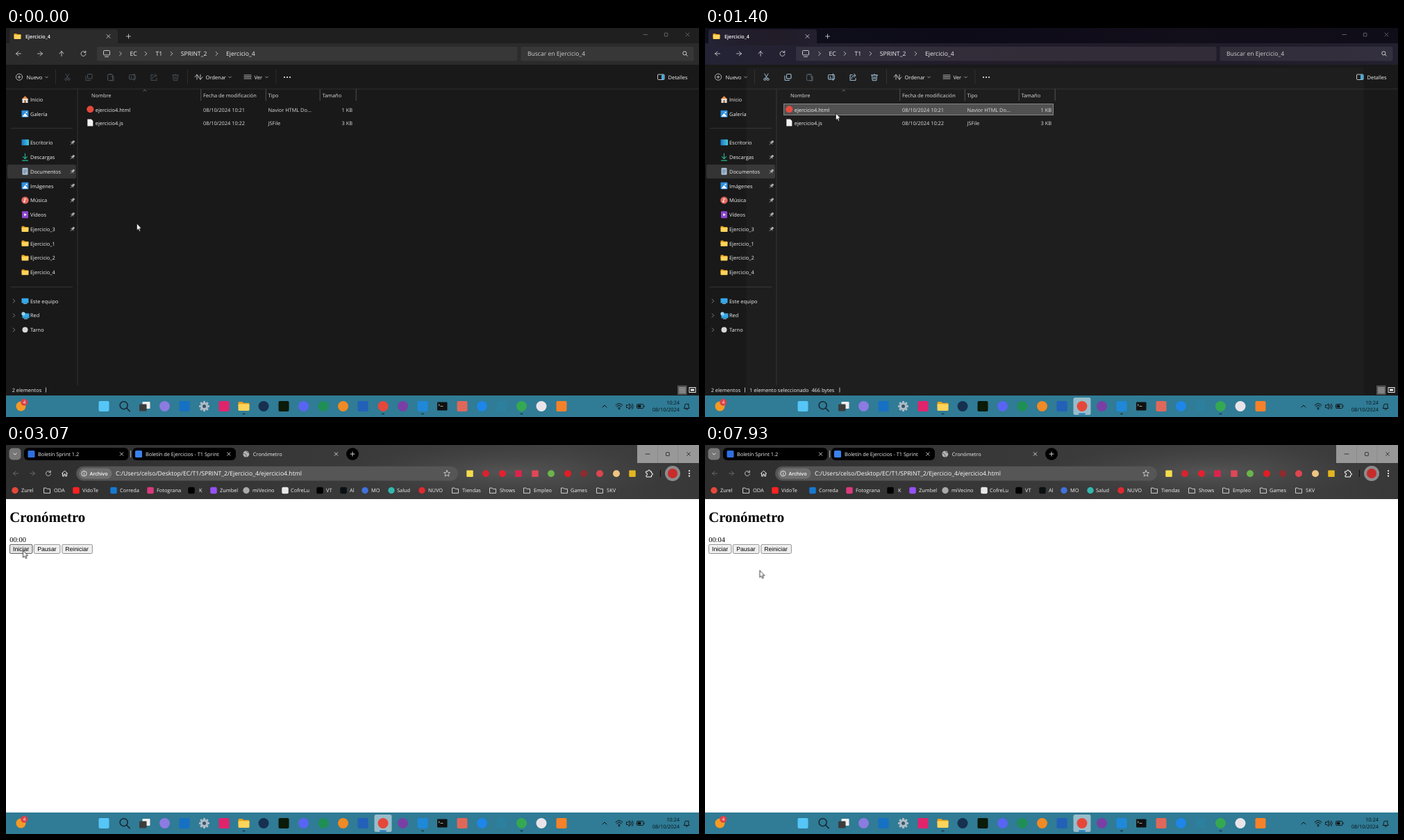
An HTML page that plays this animation: 998x561 px, repeating every 8000 ms.

```html
<!DOCTYPE html>
<html lang="es">
<head>
<meta charset="utf-8">
<title>Cronómetro</title>
<style>
html, body { margin: 0; width: 100%; height: 100%; overflow: hidden; background: #191919; }
svg { display: block; width: 100%; height: 100%; font-family: "Open Sans", "Noto Sans", sans-serif; text-rendering: geometricPrecision; }
.gate { animation: 8s step-end infinite; }
.sheet { animation: open 8s linear infinite; }
.cursor { animation: move 8s ease-in-out infinite; }
.serif { font-family: "Liberation Serif", serif; }
.sans { font-family: "Liberation Sans", sans-serif; }
@keyframes open {
  0%, 17.5% { opacity: 0; transform: translate(60px, 58px) scale(.89); }
  18%, 18.375% { opacity: 1; transform: translate(38px, 37px) scale(.928); animation-timing-function: ease-out; }
  20.6%, 100% { opacity: 1; transform: none; }
}
@keyframes move {
  0%, .7% { transform: translate(188px, 281.5px); }
  10%, 19.2% { transform: translate(188px, 122.5px); }
  23.4%, 24.2% { transform: translate(205px, 124px); }
  34.125% { transform: translate(40px, 176px); animation-timing-function: ease-out; }
  39.5%, 42.6% { transform: translate(23px, 150px); }
  47.5%, 51.5% { transform: translate(71px, 198.5px); }
  51.625%, 80.2% { transform: translate(71px, 199.3px); }
  85%, 97.6% { transform: translate(60px, 149px); animation-timing-function: linear; }
  99.1%, 100% { transform: translate(78.5px, 180.5px); }
}
</style>
</head>
<body>
<svg id="stage" viewBox="0 0 998 561" preserveAspectRatio="none"></svg>
<script>
const LOOP = 8000;
let rules = '', gates = 0;

const rect = (x, y, w, h, fill, r = 0, more = '') =>
  `<rect x="${x}" y="${y}" width="${w}" height="${h}" rx="${r}" fill="${fill}" ${more}/>`;
const frame = (x, y, w, h, color, r = 1, line = .9) => rect(x, y, w, h, 'none', r, `stroke="${color}" stroke-width="${line}"`);
const dot = (x, y, r, fill) => `<circle cx="${x}" cy="${y}" r="${r}" fill="${fill}"/>`;
const ring = (x, y, r, color, w = .8) =>
  `<circle cx="${x}" cy="${y}" r="${r}" fill="none" stroke="${color}" stroke-width="${w}"/>`;
const line = (d, color = '#ddd', w = .8) =>
  `<path d="${d}" fill="none" stroke="${color}" stroke-width="${w}" stroke-linecap="round" stroke-linejoin="round"/>`;
const shape = (d, fill) => `<path d="${d}" fill="${fill}"/>`;
// y is the middle of the capitals
const text = (x, y, s, size = 7.4, fill = '#f2f2f2', more = '') =>
  `<text x="${x}" y="${(y + size * .357).toFixed(2)}" font-size="${size}" fill="${fill}" xml:space="preserve" ${more}>${s}</text>`;
const box = (x, y, s, fill, r = 1) => rect(x - s / 2, y - s / 2, s, s, fill, r);
const each = (list, draw) => list.map(draw).join('');

// shows body only from on to off (ms)
function gate(on, off, body) {
  const name = 'g' + gates++;
  rules += `@keyframes ${name}{0%{opacity:0}${on * 100 / LOOP}%{opacity:1}${off * 100 / LOOP}%{opacity:${off < LOOP ? 0 : 1}}}`;
  return `<g class="gate" style="animation-name:${name}">${body}</g>`;
}

const cross = (x, y, color, r = 2.5) => line(`M${x - r} ${y - r}l${2 * r} ${2 * r}m0 ${-2 * r}l${-2 * r} ${2 * r}`, color);
const plus = (x, y, color, r = 3) => line(`M${x - r} ${y}h${2 * r}M${x} ${y - r}v${2 * r}`, color);
const chevR = (x, y, color = '#ddd') => line(`M${x - 1.3} ${y - 2.6}l2.6 2.6l-2.6 2.6`, color);
const chevD = (x, y, color = '#bbb', r = 1.8) => line(`M${x - r} ${y - r / 2}l${r} ${r}l${r} ${-r}`, color);
const arrow = (x, y, dx, dy, color = '#ddd') => line(
  `M${x - dx * 3.5} ${y - dy * 3.5}L${x + dx * 3.5} ${y + dy * 3.5}` +
  `M${x + dy * 3} ${y + dx * 3}L${x + dx * 3.5} ${y + dy * 3.5}L${x - dy * 3} ${y - dx * 3}`, color);
const reload = (x, y) => line(`M${x + 3} ${y - 1.8}A3.5 3.5 0 1 0 ${x + 3.5} ${y + .5}M${x + 3.3} ${y - 4}v2.4h-2.4`);
const lens = (x, y, r, color, w) => ring(x - r * .25, y - r * .25, r, color, w) + line(`M${x + r * .5} ${y + r * .5}l${r * .8} ${r * .8}`, color, w);
const folder = (x, y, k = 1) => `<g transform="translate(${x} ${y}) scale(${k})">` +
  shape('M-5-3.2q0-.9.9-.9h2.6l1.3 1.2h4.3q.9 0 .9.9v2h-10z', '#e8a21f') + rect(-5, -2, 10, 6, '#ffd45a', .8) + '</g>';
const page = (x, y, fill) => shape(`M${x - 4} ${y - 5}h5.5l2.5 2.5v7.5h-8z`, fill);
const picture = (x, y) => rect(x - 5, y - 5, 10, 10, '#2f8fe0', 1) + shape(`M${x - 4} ${y + 4}l4-5l4 5z`, '#fff') + dot(x + 2, y - 2, 1.1, '#fff');
const screen = (x, y) => rect(x - 5, y - 4, 10, 7, '#35a7e8', .8) + rect(x - 2.5, y + 3.3, 5, 1, '#8ec9e8');
const pin = (x, y) => `<g transform="translate(${x} ${y}) rotate(45)">${rect(-1.5, -3.5, 3, 4, '#aaa', .5)}${line('M-2.5.8h5M0 .8v3', '#aaa', .9)}</g>`;

const captions = color =>
  line('M918 9.5h5.5', color) + frame(948.3, 7.3, 4.6, 4.6, color, .7, .8) + cross(981.5, 9.5, color);

const frameBars = (bar, row, field) =>
  rect(0, 0, 998, 53, bar) + rect(0, 22, 998, 31, row) + rect(5, 2, 156, 23, row, 4) +
  rect(131, 27, 605.5, 20.5, field, 2) + rect(741.5, 27, 249, 20.5, field, 2);

const toolIcons = (c, paste) =>
  ring(86.3, 74, 1.5, c) + ring(90.6, 74, 1.5, c) + line('M85.8 66l4.2 6.8M91 66l-4.2 6.8', c) +
  frame(117.5, 66.5, 6.5, 6.5, c) + line('M115 69v6.5h6.5', c) +
  frame(146.5, 67, 7, 8.5, paste) + line('M149 66.5h3M152 70h3v6h-4', paste) +
  frame(177.5, 67.5, 9, 6.5, c) + text(179, 70.8, 'A', 5, c) + line('M184.5 66v9.5', c) +
  line('M212 67.5h-3v8h8v-3M211 73q0-4.5 5-4.5M214.5 66l2.5 2.5l-2.5 2.5', c) +
  line('M239.5 68h9M242.5 68q1.5-3 3 0M240.5 68l.7 7.7h5.6l.7-7.7M243 70.5v3M245 70.5v3', c);

function sidebar() {
  const items = ['Inicio', 'Galería', '', 'Escritorio', 'Descargas', 'Documentos', 'Imágenes', 'Música', 'Vídeos',
    'Ejercicio_3', 'Ejercicio_1', 'Ejercicio_2', 'Ejercicio_4', '', 'Este equipo', 'Red', 'Tarno'];
  const icons = {
    Inicio: y => shape(`M22.5 ${y}l5-5l5 5z`, '#e98b45') + rect(23.5, y - 1, 8, 6, '#e8e2dc') + rect(26.3, y + 1, 2.4, 4, '#9c6a43'),
    Galería: y => picture(27.5, y),
    Imágenes: y => picture(27.5, y),
    Escritorio: y => rect(22.5, y - 4.5, 10.5, 8.5, 'url(#desk)', .8),
    Descargas: y => line(`M27.5 ${y - 5}v7.5m-3-3l3 3l3-3M23.5 ${y + 5}h8`, '#27b893', 1.1),
    Documentos: y => rect(23.5, y - 5, 8, 10, '#a9c0d6', 1) + line(`M25.5 ${y - 2}h4m-4 2h4m-4 2h2.5`, '#43617d', .7),
    Música: y => dot(27.5, y, 5.2, '#e5685e') + line(`M27 ${y + 2}v-4.5l2 1`, '#fff', .9) + dot(26.3, y + 2, 1.1, '#fff'),
    Vídeos: y => rect(23, y - 5, 9, 10, '#8d45cf', 1) + shape(`M26.3 ${y - 2}l3.5 2l-3.5 2z`, '#fff'),
    'Este equipo': y => screen(27.5, y),
    Red: y => screen(28.5, y + 1) + dot(25, y - 2.5, 2.6, '#9cd3ee'),
    Tarno: y => dot(27.5, y, 4, '#d8d8d8')
  };
  return rect(2, 197, 99, 20, '#343434', 2) + rect(7, 144.3, 89, .8, '#3b3b3b') + rect(7, 373, 89, .8, '#3b3b3b') +
    each(items, (name, i) => {
      if (!name) return '';
      const y = 103 + i * 20.77, icon = icons[name];
      return (icon ? icon(y) : folder(27.5, y)) + text(35, y + .3, name) +
        (i > 2 && i < 10 ? pin(95.8, y) : i > 13 ? chevR(11.5, y, '#999') : '');
    });
}

const fileRow = (y, name, time, type, size, icon) =>
  icon + text(128.8, y, name) + text(284, y, time, 7.4, '#ddd') +
  text(377.5, y, type, 7.4, '#ddd') + text(499, y, size, 7.4, '#ddd', 'text-anchor="end"');

function explorer() {
  const crumbs = [[178.5, 'EC'], [215.5, 'T1'], [251.8, 'SPRINT_2'], [317, 'Ejercicio_4']];
  const heads = [[123, 'Nombre'], [284, 'Fecha de modificación'], [377.5, 'Tipo'], [455.5, 'Tamaño']];
  return rect(0, 0, 998, 530, '#191919') + frameBars('#1f1f1f', '#2b2b2b', '#373737') +
    gate(1070, LOOP, frameBars('url(#mica)', 'url(#micaRow)', 'rgba(255,255,255,.07)')) +
    captions('#777') + gate(1070, 1400, captions('#fff')) +
    folder(16.5, 12) + text(28, 12, 'Ejercicio_4', 7.2, '#fff', 'font-weight="600"') + cross(147.5, 12, '#ddd') + plus(176.5, 12, '#ddd') +
    arrow(18, 37, -1, 0) + arrow(49, 37, 1, 0) + arrow(80, 37, 0, -1) + reload(111.5, 37) +
    frame(140.5, 32.5, 9, 6.5, '#ddd') + line('M142.5 41.5h5') +
    each([165, 201.5, 238.5, 303.5], x => chevR(x, 37)) + each(crumbs, ([x, s]) => text(x, 37, s, 8.6)) +
    text(751, 37.3, 'Buscar en Ejercicio_4', 8.55, '#d2d2d2') + lens(978, 37, 2.6, '#ddd', .9) +
    rect(0, 53, 998, 35, '#191919') + rect(0, 87.5, 998, .9, '#343434') +
    ring(19, 70.7, 4.6, '#ddd') + plus(19, 70.7, '#ddd', 2) + text(29.5, 71, 'Nuevo', 7.6) + chevD(58.5, 71) +
    each([71, 261, 388.5], x => rect(x, 60, .8, 21, '#333')) +
    toolIcons('#4f5a63', '#4f5a63') + gate(1070, LOOP, toolIcons('#a9cfe8', '#4f5a63')) +
    arrow(275, 70.7, 0, -1) + arrow(280, 70.7, 0, 1) + text(287.5, 71, 'Ordenar', 7.5) + chevD(322.5, 71) +
    line('M343 68h10M343 70.5h10M343 73h10') + text(357.5, 71, 'Ver', 7.5) + chevD(375.5, 71) +
    each([401, 405, 409], x => dot(x, 71, 1.1, '#eee')) +
    frame(938.5, 67, 9.5, 7.5, '#ddd') + rect(944, 67, 4, 7.5, '#45a8dc', .8) + text(953.5, 71, 'Detalles', 7.5) +
    rect(102.5, 88, .9, 427, '#363636') + sidebar() +
    line('M197.8 91l2-1.8l2 1.8', '#999', .7) +
    each([280.3, 373.8, 451.7, 503.7], x => rect(x, 88, .9, 17, '#555')) +
    each(heads, ([x, s]) => text(x, 97.2, s, 7.4, '#ddd')) +
    gate(530, 670, rect(113, 128.5, 389, 17, '#333')) + gate(670, 1070, rect(113, 109, 389, 17, '#333')) +
    gate(1070, LOOP, rect(113.5, 109.5, 388, 16, '#4d4d4d', 0, 'stroke="#8c8c8c" stroke-width=".9"')) +
    fileRow(117.9, 'ejercicio4.html', '08/10/2024 10:21', 'Navior HTML Do...', '1 KB', dot(121.3, 117.3, 5, '#e5483a')) +
    fileRow(137.2, 'ejercicio4.js', '08/10/2024 10:22', 'JSFile', '3 KB', page(121.3, 136.5, '#f2f2f2')) +
    text(8.7, 522.5, '2 elementos') + rect(57, 518.5, .9, 7, '#ccc') +
    gate(1070, LOOP, text(64, 522.5, '1 elemento seleccionado  466 bytes') + rect(193.5, 518.5, .9, 7, '#ccc')) +
    rect(967, 515.5, 13.5, 13.5, '#555') + line('M969.5 519h9M969.5 521.3h9M969.5 523.6h9M969.5 526h9', '#eee', .7) +
    frame(984, 518.5, 9, 7, '#eee', 0, 1) + rect(986, 520.5, 5, 3, '#eee');
}

function button(x, w, label, tx, hover, press) {
  const face = (fill, edge) => rect(x + .4, 143.4, w, 13.1, fill, 2, `stroke="${edge}" stroke-width=".8"`);
  return face('#efefef', '#767676') +
    (hover ? gate(...hover, face('#e2e2e2', '#4f4f4f')) + gate(...press, face('#f6f6f6', '#8d8d8d')) : '') +
    text(tx, 149.4, label, 8.67, '#000', 'class="sans"');
}

function bookmarks() {
  const outline = (x, y) => line(`M${x - 4.5} ${y + 3.5}v-7h3.5l1.2 1.3h4.3v5.7z`, '#ddd', .9);
  const items = [[13, 22, 'Zurel', '#e5483a'], [59, 69, 'ODA'], [101, 110, 'VidoTe', '#f22', 1], [155, 164, 'Correda', '#1679d0', 1],
    [208, 217, 'Fotograna', '#d93a7c', 1], [267, 278, 'K', '#000', 1], [299, 308, 'Zumbel', '#9650f5', 1], [346, 355, 'miVecino', '#aaa'],
    [402, 410, 'CofreLu', '#e8e8e8', 1], [452, 461, 'VT', '#000', 1], [486, 495, 'Al', '#0b1113', 1], [517, 526, 'MO', '#3f72dc'],
    [555, 563, 'Salud', '#32b8ae'], [599, 608, 'NUVO', '#e02a31'], [647, 657, 'Tiendas'], [701, 711, 'Shows'],
    [750, 760, 'Empleo'], [804, 813, 'Games'], [855, 865, '5KV']];
  return each(items, ([ix, x, s, fill, square]) =>
    (!fill ? outline(ix, 65.5) : square ? box(ix, 65.5, 9.5, fill, 2) : dot(ix, 65.5, 4.7, fill)) + text(x, 65.5, s));
}

function browser() {
  const addons = [[668, '#f3dc4d', 1], [691, '#d8232e'], [715, '#e3212f'], [738, '#dc244c', 1], [762, '#e04756', 1], [785, '#6bb44b'],
    [809, '#e11d25'], [832, '#8f2b2e'], [855, '#de4550'], [879, '#edc481'], [902, '#e2b520', 1]];
  const clock = each([0, 1, 2, 3, 4], n => gate(n && 3270 + n * 1000, n < 4 ? 4270 + n * 1000 : LOOP,
    `<text class="serif" x="5.2" y="140" font-size="10.4">00:0${n}</text>`));
  return rect(0, 0, 998, 530, '#fff') + rect(0, 0, 998, 78, 'url(#stone)') + rect(490, 0, 470, 78, 'url(#haze)') +
    rect(909, 0, 89, 26, '#989898') + rect(938, 0, .7, 26, '#858585') + rect(967.5, 0, .7, 26, '#858585') +
    line('M921 13h6', '#222') + frame(950.5, 10.7, 4.8, 4.8, '#222', .5, .8) + cross(983, 13, '#222') +
    rect(4.5, 4.5, 17, 17, '#777', 5) + chevD(13, 13, '#fff', 2.2) +
    rect(26, 4, 150.5, 18, '#000', 6) + rect(182, 4, 149, 18, '#000', 6) + rect(179, 8, 1, 10, '#aaa') +
    box(36.5, 13, 10, '#2f6fe0', 1.5) + text(46, 13.2, 'Boletín Sprint 1.2') + cross(166.5, 13, '#eee', 2.3) +
    box(191, 13, 10, '#3b82ef', 1.5) + text(201, 13.2, 'Boletín de Ejercicios - T1 Sprint') + cross(320.8, 13, '#eee', 2.3) +
    dot(345.8, 13, 4.5, '#b5b5b5') + line('M342 12q3 0 3.5 2t1 3M346 9q0 2 3.5 2.5', '#555', .9) +
    text(355.7, 13.2, 'Cronómetro') + cross(475.5, 13, '#eee', 2.3) + dot(499, 13, 9, '#000') + plus(499, 13, '#fff') +
    arrow(14, 41, -1, 0, '#777') + arrow(38, 41, 1, 0, '#777') + reload(61, 41) +
    line('M80.5 41l4-3.7l4 3.7M81.5 40.5v4.5h2v-3h2v3h2v-4.5', '#eee', 1) +
    rect(101, 30.7, 550, 20.8, '#565656', 10.4) + rect(105, 33.5, 47.5, 15.2, '#707070', 7.6) +
    ring(112.5, 41.2, 3.7, '#fff') + line('M112.5 40.8v2.2M112.5 39v.1', '#fff') +
    text(120.5, 41.3, 'Archivo', 7.2, '#fff', 'font-weight="600"') +
    text(158, 41.3, 'C:/Users/celso/Desktop/EC/T1/SPRINT_2/Ejercicio_4/ejercicio4.html', 8.63, '#fff') +
    line('M635 36.5l1.3 3l3.2.3l-2.4 2.1l.7 3.2l-2.8-1.7l-2.8 1.7l.7-3.2l-2.4-2.1l3.2-.3z', '#ddd') +
    each(addons, ([x, fill, square]) => square ? box(x, 41.3, 9.5, fill) : dot(x, 41.3, 5, fill)) +
    line('M922 38h2.5q0-2 1.5-2t1.5 2h2v2.5q2 0 2 1.5t-2 1.5v2.5h-7.5v-2.5q1.8 0 1.8-1.5t-1.8-1.5z', '#fff', 1) +
    rect(942, 36, 1, 10, '#111') + dot(960, 41, 11, '#8c8c8c') + dot(960, 41, 7, '#c92b2b') +
    each([37.3, 41, 44.7], y => dot(984, y, 1.1, '#fff')) + bookmarks() +
    '<text class="serif" x="5.2" y="111.1" font-size="20.8" font-weight="bold">Cronómetro</text>' + clock +
    button(5, 32.5, 'Iniciar', 10, [2960, 3530], [3200, 3270]) +
    button(40, 37.5, 'Pausar', 45.2, [6670, 7870], [7600, 7670]) +
    button(80.5, 43.5, 'Reiniciar', 85.3);
}

function taskbar() {
  const active = x => rect(x - 12.5, 533, 25, 25, 'rgba(255,255,255,.5)', 2.5) + rect(x - 5, 555.7, 10, 1.7, '#0f6fc0', .8);
  const running = x => rect(x - 2, 555.8, 4, 1.4, '#16394a', .7);
  const apps = [[141, '#55c6f7', 1], [228.5, '#8c7be0'], [257, '#1670c4', 1], [314, '#e0246c', 1], [371, '#17304f'], [400, '#0c1a08', 1],
    [428.5, '#5865f2'], [457, '#1f8f55'], [485.5, '#f08a24'], [514, '#2360b8', 1], [543, '#e5483a'], [571.5, '#7a3fa5'],
    [600, '#2088d8', 1], [657, '#e0685a', 1], [685.5, '#1d86e8'], [714, '#2d7f9e', 1], [742.5, '#35a852'], [771, '#e9e4ea'], [800, '#f5822a', 1]];
  const teeth = each([0, 45, 90, 135, 180, 225, 270, 315], a =>
    `<g transform="rotate(${a} 285.5 545.5)">${rect(284, 538, 3, 4, '#aebbc6', .6)}</g>`);
  return rect(0, 530, 998, 31, '#307b95') + each([342.5, 543, 600, 742.5], running) +
    gate(1070, 1400, active(342.5)) + gate(1400, LOOP, active(543)) +
    dot(21.5, 545.5, 7, '#f49a25') + dot(26.3, 539.7, 5, '#d9434a') + text(26.3, 539.8, '4', 6.5, '#fff', 'text-anchor="middle"') +
    lens(171, 545.5, 5.5, '#17262e', 1.5) +
    rect(196.5, 539, 11, 10, '#eee', 1) + rect(192, 542.5, 10.5, 10, '#3c3c3c', 1) +
    each(apps, ([x, fill, square]) => square ? box(x, 545.5, 15, fill, 2) : dot(x, 545.5, 7.5, fill)) +
    teeth + dot(285.5, 545.5, 5.5, '#aebbc6') + dot(285.5, 545.5, 2.5, '#36566b') +
    folder(342.5, 545.5, 1.6) +
    rect(621, 539.5, 14.5, 12, '#111', 1) + line('M623 542.5l1.5 1.2l-1.5 1.2M626 545.5h3', '#eee', .7) +
    line('M859 547l3-3l3 3', '#111', 1) +
    line('M878 544q5-5 10 0M879.7 546q3.3-3.3 6.6 0M881.5 548q1.5-1.5 3 0', '#111', 1) + dot(883, 549.5, .9, '#111') +
    line('M893.5 544v3.5h2l2.5 2.3v-8l-2.5 2.2zM900 543.5q1.5 2 0 4.5M902 542q2.5 3.5 0 7.5', '#111', .9) +
    frame(908.5, 542.5, 9.5, 6, '#111', 1.2) + rect(909.7, 543.7, 4.7, 3.6, '#111') + rect(918.5, 544.5, 1, 2, '#111') +
    text(970, 540.3, '10:24', 7.4, '#07151c', 'text-anchor="end"') + text(970, 550.8, '08/10/2024', 7.4, '#07151c', 'text-anchor="end"') +
    line('M976.5 548.5h7.5q-1-1.5-1-3.5q0-3-2.8-3t-2.8 3q0 2-.9 3.5M979 550h2.5', '#111', .9) + text(982, 542.5, 'z', 4.5, '#111');
}

const fade = (id, stops, kind = 'linear') => `<${kind}Gradient id="${id}">` +
  each(stops, ([o, c, a = 1]) => `<stop offset="${o}" stop-color="${c}" stop-opacity="${a}"/>`) + `</${kind}Gradient>`;

const defs = '<defs>' +
  fade('mica', [[0, '#11101d'], [.35, '#0d0b18'], [.7, '#120e1a'], [1, '#0f0d18']]) +
  fade('micaRow', [[0, '#242335'], [.35, '#221d2a'], [.7, '#211c28'], [1, '#232030']]) +
  fade('desk', [[0, '#1e78c8'], [1, '#42c8dc']]) +
  fade('stone', [[0, '#2e2e2e'], [.3, '#353535'], [.55, '#3b3b3b'], [.8, '#404040'], [1, '#383838']]) +
  fade('haze', [[0, '#777', .4], [1, '#555', 0]], 'radial') + '</defs>';

document.getElementById('stage').innerHTML = defs + explorer() +
  `<g class="sheet">${rect(0, 0, 998, 530, '#fff')}</g>` + gate(1670, LOOP, browser()) + taskbar() +
  '<g class="cursor"><path d="M.3.3V10.5L2.6 8.4L4.2 11.9L5.8 11.2L4.3 7.8H7.4Z" fill="#fff" stroke="#000" stroke-width=".75"/></g>';

const style = document.createElement('style');
style.textContent = rules;
document.head.append(style);
</script>
</body>
</html>
```
